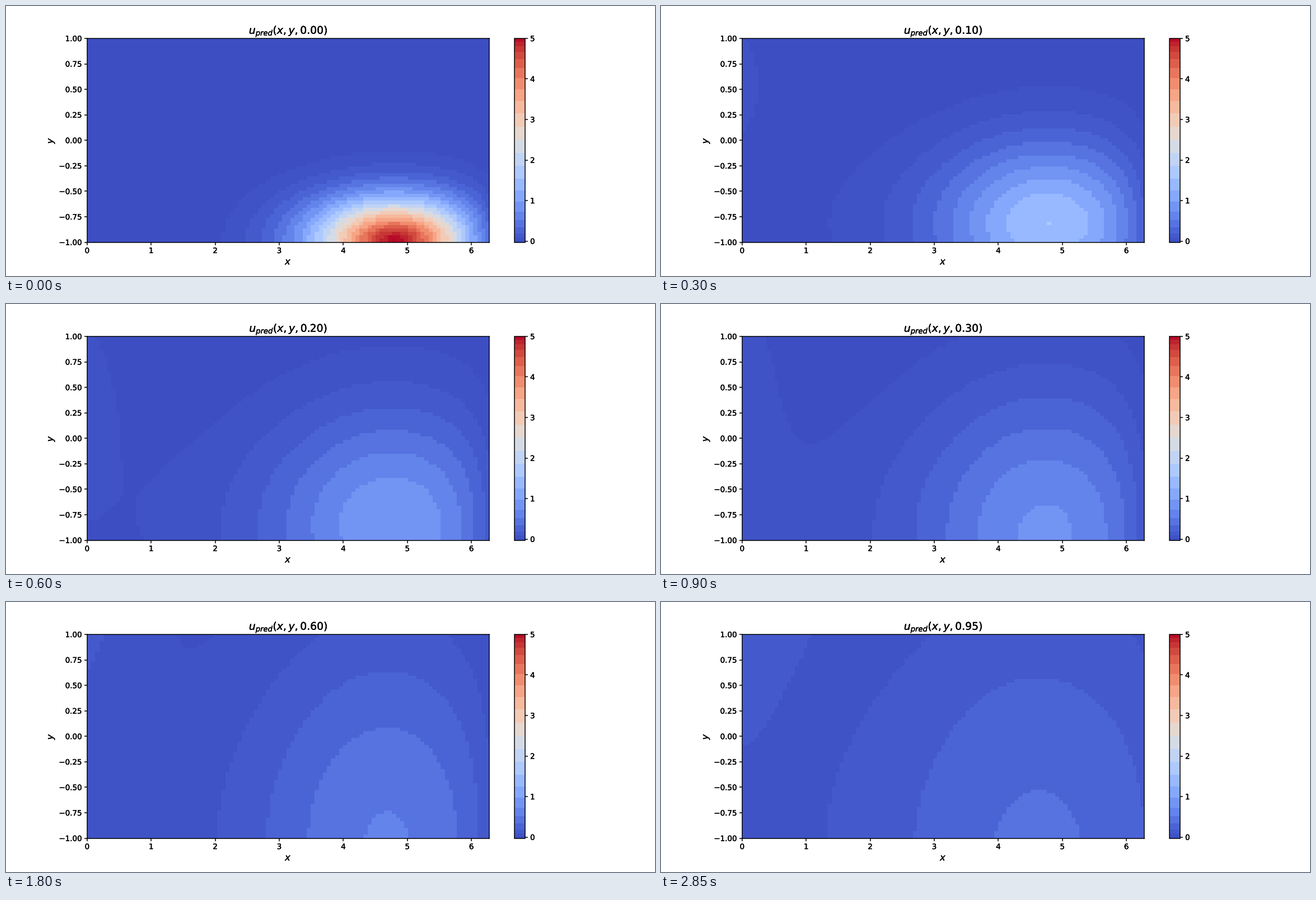
Recreate the animation shown at these times as a matplotlib script. Size 1159 px wide and 483 px high, loop 3000 ms.

```python
import numpy as np
import matplotlib.pyplot as plt
from matplotlib.animation import FuncAnimation
from matplotlib.colors import BoundaryNorm, ListedColormap
from matplotlib.patheffects import withStroke
from matplotlib.text import Text

WIDTH, HEIGHT, DPI = 1159, 483, 100
FRAMES, INTERVAL, DT = 20, 150, 0.05
SCALE = 0.966
LINE = 1.08
U_MIN, U_MAX = -0.0276, 5.0
X_MAX = 2 * np.pi

plt.rcParams.update({
    "font.family": "DejaVu Sans",
    "font.size": 10 * SCALE,
    "axes.titlesize": 14 * SCALE,
    "axes.labelsize": 12 * SCALE,
    "axes.titlepad": 6 * SCALE,
    "axes.labelpad": 4 * SCALE,
    "axes.linewidth": LINE,
})
for axis in ("xtick", "ytick"):
    plt.rcParams[f"{axis}.major.width"] = LINE
    plt.rcParams[f"{axis}.major.size"] = 3.5 * SCALE
    plt.rcParams[f"{axis}.major.pad"] = 3.5 * SCALE

x_edges = np.linspace(0, X_MAX, 100)
y_edges = np.linspace(-1, 1, 60)
X, Y = np.meshgrid(x_edges[:-1], y_edges[:-1])


def plume(t):
    """Hot spot on the lower wall that spreads and cools."""
    log_peak = 1.61 / (1 + (t / 0.065)**2) - 1.07 * t
    dx = np.abs(X - (4.78 - 0.2 * t))
    spread_x = 0.35 + 0.4 * np.exp(-10 * t) - 0.19 * t**3
    tail = 1 + 0.01 * np.tanh(15 * t) * dx**3
    right_wall = 1.2 * (1 - t**3) * np.exp(4 * (X - X_MAX))
    dy = Y + 1
    lift = 36 * t * np.exp(-15 * t) - 0.1 * t
    spread_y = 1 / (0.14 + 5 * t**1.25)
    return np.exp(log_peak - spread_x * dx**2 / tail - right_wall
                  + lift * dy - spread_y * dy**2)


def inflow(t):
    """Faint warmth at the left wall, first a sinking bump, then a slope."""
    strength = 0.02 + 0.035 * np.tanh(2 * t)
    bump = max(0, 2 - 5 * t) * (Y - 0.8 + 3 * t)**2
    decay = 2.2 - 1.3 * t
    return strength * np.exp(1.2 * t * Y - bump - decay * X**1.3)


def field(t):
    return np.clip(plume(t) + inflow(t), 0, U_MAX - 0.001)


# Colour bands: narrow at both ends of the range, wide in the middle
levels = U_MAX / 2 * (1 - np.cos(np.linspace(0, np.pi, 25)))
levels[0] = U_MIN
middles = (levels[:-1] + levels[1:]) / 2
cmap = ListedColormap(
    plt.get_cmap("coolwarm")((middles - U_MIN) / (U_MAX - U_MIN)))

fig = plt.figure(figsize=(WIDTH / DPI, HEIGHT / DPI), dpi=DPI, facecolor="white")
ax = fig.add_axes([0.125, 0.125, 0.62, 0.755])
cax = fig.add_axes([0.7838, 0.125, 0.0157, 0.755])

mesh = ax.pcolormesh(x_edges, y_edges, field(0), cmap=cmap,
                     norm=BoundaryNorm(levels, cmap.N))
ax.set(xlim=(0, X_MAX), ylim=(-1, 1), xlabel="$x$", ylabel="$y$")
title = ax.set_title("")

bar = fig.colorbar(mesh, cax=cax, ticks=range(6), spacing="proportional",
                   format="%d")
bar.minorticks_off()

fig.canvas.draw()
for text in fig.findobj(Text):
    text.set_path_effects([withStroke(linewidth=0.3, foreground="black")])


def update(frame):
    t = frame * DT
    mesh.set_array(field(t))
    title.set_text(rf"$u_{{pred}}(x,y,{t:.2f})$")
    return mesh, title


anim = FuncAnimation(fig, update, frames=FRAMES, interval=INTERVAL,
                     init_func=lambda: update(0), repeat=True, repeat_delay=0)
plt.show()
```
